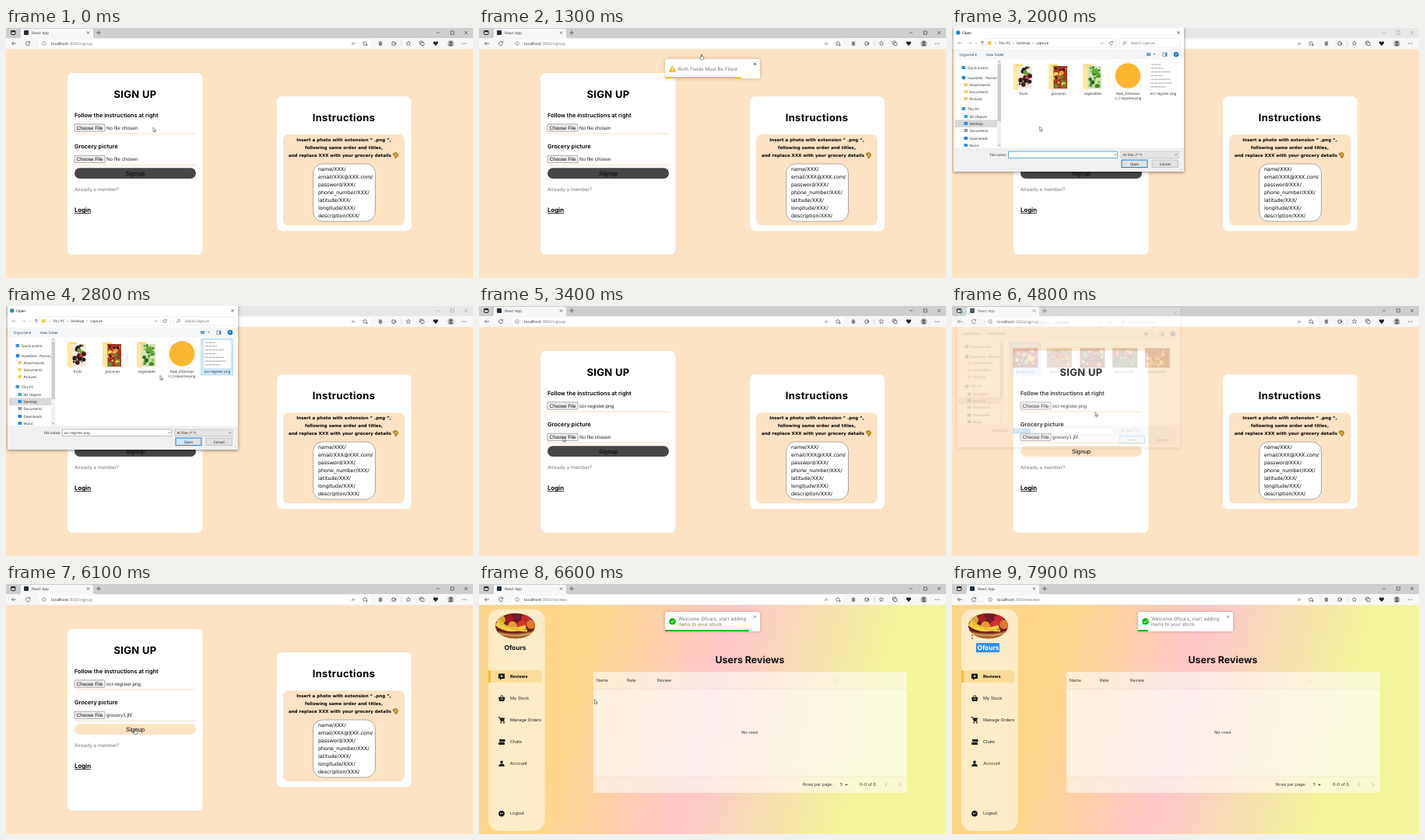
These frames come from a looping animation (600 px wide and 322 px high, 8 s). An HTML page:

```html
<!DOCTYPE html>
<html lang="en">
<head>
<meta charset="utf-8">
<title>Sign up walkthrough</title>
<style>
html, body { margin: 0; width: 100%; height: 100%; overflow: hidden; }
svg { display: block; width: 100vw; height: 100vh; }
text { white-space: pre; text-rendering: geometricPrecision; }
.inter { font-family: Inter, sans-serif; }
.ui { font-family: "Open Sans", sans-serif; }
.arial { font-family: "Liberation Sans", Arial, sans-serif; }
.wide { font-family: "DejaVu Sans", sans-serif; }
#dialog { filter: drop-shadow(0 1px 2px rgba(0,0,0,.45)); }
.toast { filter: drop-shadow(0 .5px 2px rgba(0,0,0,.22)); }
</style>
</head>
<body>
<svg id="stage" viewBox="0 0 600 322" preserveAspectRatio="none"></svg>
<script>
const LOOP = 8000;
const stage = document.getElementById('stage');
const PEACH = '#fde2c3';

// Markup helpers
const text = (font, x, y, size, str, more = '') =>
  `<text class="${font}" x="${x}" y="${y}" font-size="${size}" ${more}>${str}</text>`;
const rect = (x, y, w, h, fill, more = '') =>
  `<rect x="${x}" y="${y}" width="${w}" height="${h}" fill="${fill}" ${more}/>`;
const dot = (x, y, r, fill, more = '') =>
  `<circle cx="${x}" cy="${y}" r="${r}" fill="${fill}" ${more}/>`;
const line = (d, color = '#444', width = .7, more = '') =>
  `<path d="${d}" fill="none" stroke="${color}" stroke-width="${width}" ${more}/>`;
const shape = (d, fill, more = '') => `<path d="${d}" fill="${fill}" ${more}/>`;
const group = (id, body, more = '') => `<g id="${id}" ${more}>${body}</g>`;
const cross = (x, y, r, color, width) =>
  line(`M${x - r} ${y - r}l${2 * r} ${2 * r}m0 ${-2 * r}l${-2 * r} ${2 * r}`, color, width);
const MID = 'text-anchor="middle"', BOLD = 'font-weight="700"', SEMI = 'font-weight="600"';

function random(seed) {
  return () => (seed = (seed * 16807) % 2147483647) / 2147483647;
}

// A loose heap of fruit in a few colours
function produce(x, y, w, h, base, colors, seed) {
  const next = random(seed);
  let body = rect(x, y, w, h, base);
  for (let i = 0; i < 26; i++) {
    const r = 1.2 + next() * 1.8;
    body += dot((x + r + next() * (w - 2 * r)).toFixed(1), (y + r + next() * (h - 2 * r)).toFixed(1),
      r.toFixed(1), colors[i % colors.length]);
  }
  return body;
}

// Browser frame
function browser() {
  const star = x => line(`M${x} 17l.8 1.9 2 .2-1.5 1.3.5 2-1.8-1.1-1.8 1.1.5-2-1.5-1.3 2-.2z`, '#555', .6);
  return rect(0, 0, 600, 14, '#cecece', 'id="strip"') + rect(0, 13, 600, 14, '#f7f7f7') +
    shape('M17 13Q19 13 19 11V3Q19 1 21 1H110Q112 1 112 3V11Q112 13 114 13Z', '#f7f7f7') +
    rect(6.5, 3.5, 5.5, 5, 'none', 'rx="1" stroke="#222"') + line('M6.5 4.5h5.5', '#222', 1.4) +
    rect(23, 3, 6, 6, '#20303a', 'rx="1"') +
    text('ui', 33, 8, 4.7, 'React App', 'fill="#333"') +
    cross(105.5, 6, 1.6, '#444', .7) + line('M116 6h6m-3-3v6', '#444', .7) +
    group('winButtons', line('M553 6h4', '#333', .6) +
      rect(571.5, 4, 4, 4, 'none', 'stroke="#333" stroke-width=".6"') + cross(591, 6, 2, '#333', .6)) +
    line('M13 20H7.5m2.3-2.3L7.5 20l2.3 2.3', '#444') +
    line('M30.3 18.6A2.6 2.6 0 1 0 30.6 20.6M30.6 17v1.9h-1.9', '#444') +
    rect(42, 15, 426, 10.5, '#fff', 'rx="2.5"') +
    dot(49, 20, 2.4, 'none', 'stroke="#666" stroke-width=".6"') + line('M49 19.6v1.6M49 18.4v.6', '#666', .6) +
    text('ui', 58, 22, 5.2, '<tspan fill="#222">localhost</tspan>:3000/<tspan id="route"></tspan>', 'fill="#777"') +
    text('ui', 444, 22, 5.2, 'A<tspan font-size="3.8" dy="-1.5">»</tspan>', 'fill="#666"') +
    star(461) + rect(461.8, 20.3, 3, 3, '#fff') + line('M461.8 21.8h3m-1.5-1.5v3', '#444', .7) +
    rect(478.8, 17.2, 4.4, 5.8, '#888', 'rx="1.8"') +
    rect(496, 18, 4.2, 4.2, 'none', 'rx="1" stroke="#444" stroke-width=".8"') + dot(500.3, 20, .9, '#444') +
    line('M508 16.5v7', '#bbb', .5) + star(517) +
    rect(531.5, 17, 4, 4, 'none', 'rx=".8" stroke="#444" stroke-width=".7"') +
    rect(533, 18.5, 4, 4, '#f7f7f7', 'rx=".8" stroke="#444" stroke-width=".7"') +
    shape('M552 23L548.8 19.6Q548.6 16.8 551 17.2L552 18.2 553 17.2Q555.4 16.8 555.2 19.6Z', '#222') +
    dot(571.5, 20, 4, '#b4b0ac') + dot(571.5, 18.8, 1.7, '#5c5856') + shape('M568.5 22.8Q571.5 18.9 574.5 22.8Z', '#5c5856') +
    [586.5, 588.8, 591.1].map(x => dot(x, 20, .6, '#333')).join('');
}

// Sign-up page
function fileInput(y, id) {
  return rect(88, y, 39, 9.4, '#efefef', 'rx=".8" stroke="#777" stroke-width=".6"') +
    text('arial', 90.6, y + 7, 6.35, 'Choose File') +
    text('arial', 129, y + 7, 6.35, 'No file chosen', `id="${id}" fill="#222"`) +
    line(`M88 ${y + 12.2}H244`, '#fbdcc0', .9);
}

function signup() {
  const fields = ['name/XXX/', 'email/XXX@XXX.com/', 'password/XXX/', 'phone_number/XXX/',
    'latitude/XXX/', 'longitude/XXX/', 'description/XXX/'];
  const note = ['Insert a photo with extension “ .png “,', 'following same order and titles,',
    'and replace XXX with your grocery details'];
  return rect(0, 27, 600, 295, PEACH) + rect(79, 58, 173.5, 234, '#fff', 'rx="7"') +
    text('inter', 166, 90, 13, 'SIGN UP', `${MID} ${BOLD} letter-spacing=".3"`) +
    text('inter', 88, 114.5, 7.36, 'Follow the instructions at right', SEMI) + fileInput(123.8, 'file1') +
    text('inter', 88, 155, 7.36, 'Grocery picture', SEMI) + fileInput(164.2, 'file2') +
    rect(88, 180.3, 156, 13.6, '#464646', 'rx="6.8" id="button"') +
    text('arial', 166, 190, 7.7, 'Signup', MID) +
    text('inter', 88, 210.3, 6.25, 'Already a member?', 'fill="#777"') +
    text('inter', 88, 237.3, 7.75, 'Login', BOLD) + line('M88 238.6h21', '#000', .8) +
    rect(348, 88, 173, 173.5, '#fff', 'rx="7"') +
    text('inter', 434, 120, 13, 'Instructions', `${MID} ${BOLD} letter-spacing=".35"`) +
    rect(356, 137.3, 156, 117, PEACH, 'rx="7"') +
    note.map((s, i) => text('wide', i < 2 ? 434 : 429, 146.3 + i * 10, 5.55, s, `${MID} ${BOLD}`)).join('') +
    shape('M497.5 161.5l4-1 2 2.2-.6 2.6-2 2.4-1-.7.2-2-2.4-1.4z', '#dba62c', 'stroke="#6b4510" stroke-width=".7"') +
    rect(394.7, 175, 79.8, 74, '#fff', 'rx="12" stroke="#777" stroke-width=".6"') +
    fields.map((s, i) => text('wide', 401, 184.2 + i * 9.95, 6.4, s)).join('');
}

// Reviews page
function reviews() {
  const menu = [['Reviews', 119], ['My Stock', 147], ['Manage Orders', 175], ['Chats', 203], ['Account', 231], ['Logout', 295]];
  const icons = [
    rect(25, 115.5, 8, 6.5, '#111', 'rx="1"') + shape('M27 121v3l3-3z', '#111') + dot(29, 118.8, 1.3, '#fbe2a6'),
    shape('M25 146h8.4l-1.2 5h-6z', '#111') + line('M27 146q2.2-4.6 4.4 0', '#111', 1) + line('M27.5 148h3.6', '#fdebcd', .8),
    line('M24.5 171.5h1.8l1.8 5h4.5', '#111', 1) + shape('M27 172.5h6.3l-1.5 3.2H28z', '#111') + dot(28.3, 178.4, 1, '#111') + dot(32, 178.4, 1, '#111'),
    rect(26, 200, 7.5, 3.2, '#111', 'rx=".8"') + rect(25, 204, 8, 3, '#111', 'rx=".8"'),
    dot(29, 229.4, 1.8, '#111') + shape('M25.3 235q0-3.4 3.7-3.4t3.7 3.4z', '#111'),
    dot(29, 295.7, 3.8, '#111') + line('M31 295.7h-4m1.3-1.2l-1.3 1.2 1.3 1.2', '#fdebcd', .7)];
  const white = a => `rgba(255,255,255,${a})`;
  const nameText = fill => text('inter', 46.5, 85, 8.4, 'Ofours', `${MID} ${BOLD} fill="${fill}"`);
  const avatar = rect(20, 37, 54, 34, '#6b1d1c') +
    [[28, 46, 6, '#d8a93a'], [39, 45, 5, '#a31c22'], [49, 43, 5, '#741a2c'], [60, 45, 6, '#c8292a'],
      [67, 52, 6, '#e0772b'], [55, 53, 6, '#d3352c'], [43, 54, 6, '#e69a35']].map(c => dot(...c)).join('') +
    line('M22 51Q37 64 60 55', '#f5d048', 5) + line('M24 47Q38 60 62 60', '#f0c035', 3) +
    shape('M20 60Q47 68 74 59V72H20Z', '#a8672f') + line('M22 63Q47 70 72 62', '#e5b77b', 1.2);
  return rect(0, 27, 600, 295, 'url(#sky)') + rect(12, 32.5, 72.5, 285.5, white(.52), 'rx="14"') +
    `<g clip-path="url(#oval)">${avatar}</g>` +
    nameText('#111') + rect(31, 76, 30, 12, '#3390f0', 'class="selection"') +
    `<g clip-path="url(#selected)">${nameText('#fff')}</g>` +
    rect(12, 111.3, 68.5, 15.5, '#fbd98c', 'rx="3" opacity=".8"') + rect(12, 111.3, 3, 15.5, '#f6bb35') +
    icons.join('') +
    menu.map(([s, y], i) => text('inter', 40, y + 2.2, 5.5, s, i ? 'fill="#222"' : BOLD)).join('') +
    text('inter', 348, 101.7, 12.4, 'Users Reviews', `${MID} ${BOLD} fill="#111"`) +
    rect(147, 113, 402.5, 156, white(.55)) + rect(147, 135.5, 402.5, 112.5, white(.28)) +
    line('M147 135.5H549.5M147 248H549.5', 'rgba(120,110,90,.14)', .6) +
    line('M460 122v5', 'rgba(120,110,90,.3)', .6) +
    [['Name', 151], ['Rate', 190], ['Review', 229]].map(([s, x]) => text('inter', x, 126.2, 5.4, s, 'fill="#333"')).join('') +
    text('inter', 348, 193.4, 5.5, 'No rows', `${MID} fill="#333"`) +
    text('inter', 416, 260.3, 5.3, 'Rows per page:', 'fill="#333"') + text('inter', 464, 260.3, 5.3, '5', 'fill="#333"') +
    shape('M470 257.8h4l-2 2.2z', '#555') + text('inter', 489, 260.3, 5.3, '0–0 of 0', 'fill="#333"') +
    line('M524 256.3l-2 2.2 2 2.2M539.8 256.3l2 2.2-2 2.2', '#aaa', .8);
}

// Notification with a shrinking bar
function toast(id, y, icon, lines, color, crossColor) {
  const first = lines.length > 1 ? 11 : 15;
  return group(id, rect(239, y, 122, 25, '#fff', 'rx="1.5"') + icon +
    lines.map((s, i) => text('inter', 256, y + first + i * 7.2, 6.2, s, 'fill="#757575"')).join('') +
    cross(354.5, y + 6.3, 1.6, crossColor, .8) + rect(239, y + 23, 122, 2, color, 'class="bar"'), 'class="toast"');
}

// File picker
function dialog() {
  const ui = (x, y, s, more = 'fill="#222"') => text('ui', x, y, 4.5, s, more);
  const label = (x, s, y = 86) => ui(x, y, s, `${MID} fill="#222"`);
  const side = [['Quick access', 51, '#3a8ee0'], ['HazeDisk - Person', 64, '#1a7fd4'], ['Attachments', 73, '#f3cc62', 1],
    ['Documents', 82, '#f3cc62', 1], ['Pictures', 91, '#f3cc62', 1], ['This PC', 104, '#4a90c8'], ['3D Objects', 114, '#38a7c4', 1],
    ['Desktop', 123, '#2a8be0', 1], ['Documents', 132, '#8a9aa8', 1], ['Downloads', 142, '#2a7fd0', 1], ['Music', 151, '#2a8fd8', 1]];
  const sideItem = ([s, y, color, sub]) =>
    (color === '#1a7fd4' ? dot(15, y, 2.4, color) : rect(sub ? 15.5 : 12.5, y - 2, 4.6, 4, color, 'rx=".6"')) +
    ui(sub ? 22.5 : 20, y + 1.7, s);
  const crumb = (x, s) => ui(x, 21.2, s) + line(`M${x - 4.6} 18.2l1.3 1.4-1.3 1.4`, '#666', .5);
  const folder = (x, name, base, colors, seed) =>
    shape(`M${x - 13} 46.5h11l2 2.5h6v29h-19z`, '#f8d878') + produce(x - 7, 49, 18, 29, base, colors, seed) +
    shape(`M${x - 13} 46.5l6.5 4v31l-6.5-4z`, '#ffe79f') + label(x, name);
  const next = random(9);
  const sheet = rect(254, 44, 35, 36, '#fff', 'stroke="#e4e4e4" stroke-width=".4"') +
    Array.from({ length: 7 }, (_, i) => line(`M255.5 ${47 + i * 4.8}h${(13 + next() * 15).toFixed(1)}`, '#777', .8, 'stroke-dasharray="1 .3"')).join('');
  const selection = (id, x, y) => rect(x, y, 41, 89 - y, '#cce8ff', `id="${id}" stroke="#7fc0f5" stroke-width=".6" stroke-dasharray="1 .6"`);
  const capture = folder(92, 'fruits', '#f3ece6', ['#2a1a1e', '#d8342f', '#4a1522', '#6f9c3a', '#2b1a1c'], 11) +
    folder(137, 'groceries', '#a8341f', ['#e23a2c', '#f1a02f', '#57902f', '#2a1a14', '#f4d34a'], 29) +
    folder(181, 'vegetables', '#cfe2b4', ['#62a83a', '#3f8a2a', '#8fc552', '#4f9a30', '#2f6a22'], 43) +
    rect(209, 44, 34, 36, '#fff', 'stroke="#ddd" stroke-width=".4"') + dot(226, 61.5, 16.3, '#fbb62f') +
    label(226, 'Nael_ElDarwaz') + label(226, 'ri_Cropaline.png', 92.3) +
    selection('pick1', 250.5, 42) + sheet + label(271.5, 'ocr-register.png');
  const fruit = ['#f3c93e', '#d8322b', '#ef8d2d', '#5f9d38', '#7c2346'];
  const groceries = selection('pick2', 72, 44) + [92, 137, 181, 224, 267].map((x, i) =>
    produce(x - 16, 53, 33, 26, ['#7a2420', '#9c6a3a', '#6e3a24', '#54582c', '#8a3c20'][i], fruit.slice(i % 2), 71 + i * 13) +
    label(x, `grocery${i + 1}.jfif`)).join('');
  const chip = (x, w, s, stroke, width) =>
    rect(x, 170, w, 9.6, '#e1e1e1', `stroke="${stroke}" stroke-width="${width}"`) + ui(x + w / 2, 176.5, s, `${MID} fill="#111"`);
  return rect(2, -1, 296, 186, '#fff') + dot(7.8, 6, 2.7, '#1c8fb5') + text('ui', 13, 7.8, 4.8, 'Open') + cross(291, 6, 1.8, '#333', .6) +
    line('M13 19.5H7.8m2-2l-2 2 2 2', '#999', .6) + line('M20 19.5h5.2m-2-2l2 2-2 2', '#bbb', .6) +
    line('M29.5 18.8l1.2 1.3 1.2-1.3', '#888', .5) + line('M39 22.3V17m-2.1 2.1L39 17l2.1 2.1', '#444', .6) +
    rect(43.5, 13.5, 168, 11.5, '#fff', 'stroke="#dedede" stroke-width=".5"') + rect(46, 17, 4.5, 5, '#f3cc62') +
    crumb(60, 'This PC') + crumb(83, 'Desktop') + crumb(108, 'capture') + group('subPath', crumb(132, 'groceries')) +
    line('M191 18.6l1.6 1.8 1.6-1.8', '#555', .6) + line('M205.8 18.3A2 2 0 1 0 206.2 20M206.3 16.8v1.7h-1.6', '#444', .6) +
    rect(215, 13.5, 78, 11.5, '#fff', 'stroke="#dedede" stroke-width=".5"') +
    dot(222, 18.8, 1.6, 'none', 'stroke="#666" stroke-width=".6"') + line('M220.9 20l-1.8 1.9', '#666', .6) +
    text('ui', 229.5, 21.2, 4.5, '', 'id="search" fill="#666"') +
    rect(2, 27.5, 296, 13, '#f5f6f7') + ui(9.5, 35.7, 'Organize ▾', 'fill="#1e3d66"') + ui(44, 35.7, 'New folder', 'fill="#1e3d66"') +
    rect(250, 32, 5, 4, '#6aa0d0') + shape('M259 33.3h2.6l-1.3 1.5z', '#555') +
    rect(271, 32, 5, 4.2, '#fff', 'stroke="#556" stroke-width=".6"') + rect(274, 32, 2, 4.2, '#4a86c0') +
    dot(288, 34, 3.2, '#1976c8') + text('ui', 288, 35.7, 4.8, '?', `${MID} ${BOLD} fill="#fff"`) +
    rect(2, 40.5, 65, 114, '#fff') + rect(3.5, 118.3, 54.5, 9.6, '#d9d9d9') + side.map(sideItem).join('') +
    rect(58.3, 41, 5, 113, '#f0f0f0') + rect(58.6, 46, 4.4, 74, '#cdcdcd') +
    line('M59.5 44l1.3-1.4 1.3 1.4M59.5 150.5l1.3 1.4 1.3-1.4', '#666', .6) +
    group('capture', capture) + group('groceries', groceries) +
    rect(2, 154.5, 296, 30.5, '#f0f0f0') + ui(70, 164.7, 'File name:', 'text-anchor="end" fill="#222"') +
    rect(72.5, 159, 140, 8.4, '#fff', 'id="field" stroke-width=".6"') + rect(75.5, 160.2, 24, 6, '#0078d7', 'id="fieldMark"') +
    text('ui', 74.5, 164.7, 4.5, '', 'id="fileName"') + line('M208 162.4l1.6 1.7 1.6-1.7', '#444', .6) +
    rect(217, 159, 74, 8.4, '#e5e5e5', 'stroke="#aaa" stroke-width=".5"') + ui(219.5, 164.7, 'All files (*.*)') +
    line('M286 162.4l1.6 1.7 1.6-1.7', '#444', .6) +
    chip(218, 33, 'Open', '#0078d7', .9) + chip(257, 33.5, 'Cancel', '#adadad', .6) +
    line('M292.5 183.5l3-3M294.5 183.5l1-1', '#aaa', .5);
}

stage.innerHTML = `<defs>
  <linearGradient id="sky" gradientUnits="userSpaceOnUse" x1="-29" y1="87" x2="629" y2="263">
    <stop offset="0" stop-color="#fdd488"/><stop offset=".24" stop-color="#fdd78c"/>
    <stop offset=".49" stop-color="#fdc7cb"/><stop offset=".79" stop-color="#f2f598"/><stop offset="1" stop-color="#f3f59c"/>
  </linearGradient>
  <clipPath id="oval"><ellipse cx="46.5" cy="54" rx="25.5" ry="16.2"/></clipPath>
  <clipPath id="selected"><rect class="selection" x="31" y="76" width="30" height="12"/></clipPath></defs>` +
  group('signup', signup()) + group('reviews', reviews()) +
  toast('warning', 40, shape('M248.5 48.6l4.3 7.9h-8.6z', '#f1c40f', 'stroke="#f1c40f" stroke-linejoin="round"') +
    line('M248.5 50.8v3M248.5 54.6v1', '#fff', .9), ['Both Fields Must Be Filled.'], '#f1c40f', '#111') +
  toast('welcome', 36, dot(248.5, 48.2, 4.3, '#07bc0c') + line('M246.4 48.3l1.5 1.6 2.8-3.2', '#fff', 1),
    ['Welcome Ofours, start adding', 'items to your stock.'], '#07bc0c', '#777') +
  browser() + group('dialog', dialog()) +
  group('pointer',
    group('arrow', shape('M0 0V5.6L1.3 4.4 2.2 6.4 3.1 6 2.2 4.1H4Z', '#fff', 'stroke="#222" stroke-width=".5"')) +
    group('hand', shape('M-.5 0Q0-.5.5 0V2.4L2.8 3.1V5L2 6.6H-.8L-2.4 4 -1.9 3.4 -.5 4.2Z', '#fff', 'stroke="#222" stroke-width=".5"')) +
    group('beam', line('M-1.2-2.5H1.2M0-2.5V2.5M-1.2 2.5H1.2', '#222', .5)));

const $ = id => document.getElementById(id);
const show = (id, on) => { $(id).style.display = on ? '' : 'none'; };
const clamp = v => Math.max(0, Math.min(1, v));

// Eased value between [time, value...] stops
function track(t, stops) {
  let i = 0;
  while (i < stops.length - 2 && t >= stops[i + 1][0]) i++;
  const [a, b] = [stops[i], stops[i + 1]];
  const p = clamp((t - a[0]) / (b[0] - a[0])), k = p * p * (3 - 2 * p);
  return a.slice(1).map((v, j) => v + (b[j + 1] - v) * k);
}

const POINTER = [[0, 189, 128], [400, 189, 128], [1300, 286, 34], [1750, 108, 129], [1950, 108, 129], [2450, 270, 66],
  [2600, 270, 66], [2800, 198, 89.5], [3050, 234, 174], [3150, 234, 174], [3400, 108, 169], [3550, 108, 169],
  [3700, 110, 102.5], [3900, 137, 65], [4000, 137, 65], [4250, 92, 68], [4350, 92, 68], [4580, 234, 174], [4650, 234, 174],
  [4800, 184, 136.5], [5300, 166, 187], [6300, 166, 187], [6600, 148.5, 148.5], [6900, 148.5, 148.5], [7450, 61, 83],
  [7550, 61, 83], [7720, 33, 76], [7800, 26, 68], [7900, 26, 68]];
const DIALOG = [[1800, 0], [1950, 1], [3080, 1], [3250, 0], [3430, 0], [3560, 1], [4640, 1], [4870, 0]];

function bounce(t, start) {
  const at = f => start + f * 230;
  return track(t, [[at(0), -70], [at(.6), 9], [at(.75), -4], [at(.9), 2], [at(1), 0]])[0];
}

function setToast(id, on, y, left) {
  show(id, on);
  $(id).setAttribute('transform', `translate(0 ${y})`);
  $(id).querySelector('.bar').setAttribute('width', 122 * clamp(left));
}

function draw(t) {
  const inside = t >= 6280;
  show('signup', !inside);
  show('reviews', inside);
  $('route').textContent = inside ? 'reviews' : 'signup';
  $('file1').textContent = t < 3080 ? 'No file chosen' : 'ocr-register.png';
  $('file2').textContent = t < 4640 ? 'No file chosen' : 'grocery1.jfif';
  $('button').setAttribute('fill', t < 4640 ? '#464646' : PEACH);

  // The first bar pauses while hovered
  setToast('warning', t >= 100 && t < 1620, t < 1400 ? bounce(t, 80) : track(t, [[1450, 0], [1620, -75]])[0],
    Math.max(.8, 1 - (t - 150) * .0006));
  setToast('welcome', inside, bounce(t, 6300), 1 - (t - 6408) * .000598);

  const [open] = track(t, DIALOG);
  const second = t > 3350, nested = t >= 4020;
  const picked = second ? t >= 4280 : t >= 2500;
  show('dialog', open > 0);
  $('dialog').setAttribute('opacity', open);
  $('dialog').setAttribute('transform', `translate(150 92.5) scale(${.96 + .04 * open}) translate(-150 -92.5)`);
  const inactive = open > .5;
  $('strip').setAttribute('fill', inactive ? '#e7e7e7' : '#cecece');
  $('winButtons').setAttribute('opacity', inactive ? .4 : 1);
  show('capture', !nested);
  show('groceries', nested);
  show('subPath', nested);
  show('pick1', picked && !second);
  show('pick2', picked && nested);
  show('fieldMark', picked && second);
  $('search').textContent = nested ? 'Search groceries' : 'Search capture';
  $('fileName').textContent = picked ? (second ? 'grocery1.jfif' : 'ocr-register.png') : '';
  $('fileName').setAttribute('fill', second ? '#fff' : '#222');
  $('field').setAttribute('stroke', picked ? '#999' : '#0078d7');

  const [x, y] = track(t, POINTER);
  const from = t < 7550 ? 61 : Math.max(31, 61 - (t - 7550) * .18);
  document.querySelectorAll('.selection').forEach(r => {
    r.setAttribute('x', from);
    r.setAttribute('width', 61 - from);
  });
  $('pointer').setAttribute('transform', `translate(${x} ${y})`);
  const hand = (t > 1150 && t < 1450) || (t > 5200 && t < 6300), beam = t > 7400;
  show('hand', hand);
  show('beam', beam);
  show('arrow', !hand && !beam);
}

const start = performance.now();
function frame() {
  draw((performance.now() - start) % LOOP);
  requestAnimationFrame(frame);
}
draw(0);
requestAnimationFrame(frame);
</script>
</body>
</html>
```
